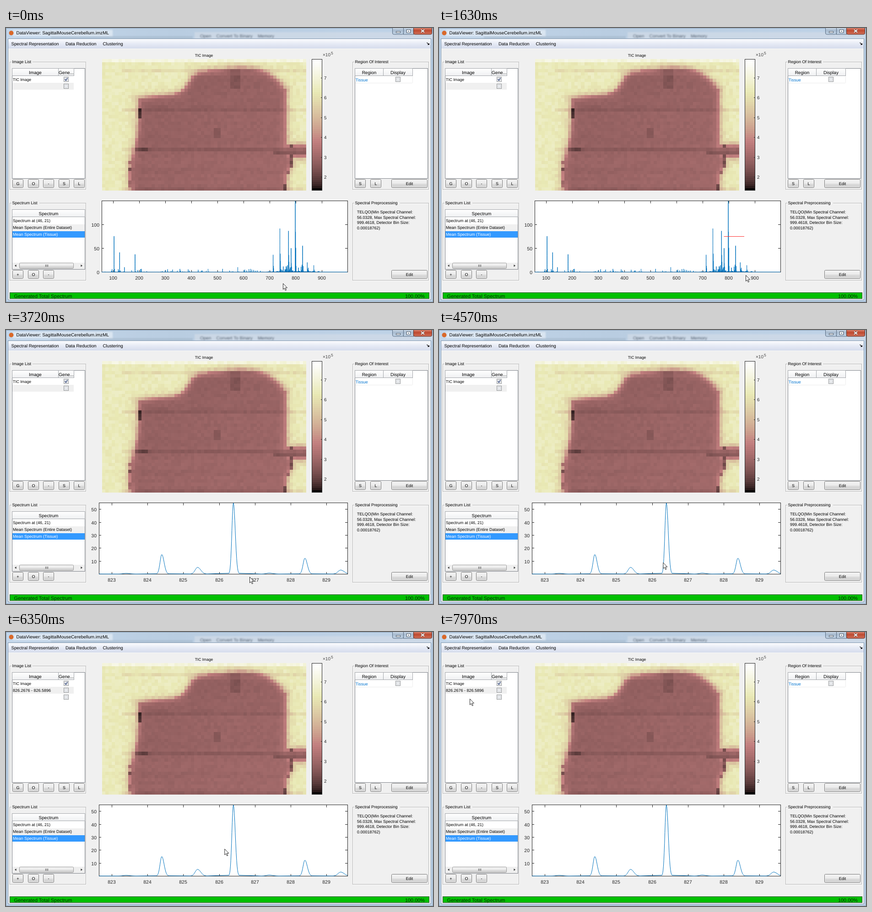
Write an HTML page that moves like this. It is 933 px wide and 600 px high and loops after 8000 ms.

```html
<!DOCTYPE html>
<html lang="en">
<head>
<meta charset="utf-8">
<title>DataViewer</title>
<style>
  html, body { margin: 0; width: 100%; height: 100%; overflow: hidden; background: #f0f0f0; }
  svg { display: block; width: 933px; height: 600px; }
  text { font-family: "Liberation Sans", Arial, sans-serif; text-rendering: geometricPrecision; white-space: pre; }
</style>
</head>
<body>
<svg id="stage" viewBox="0 0 933 600" xmlns="http://www.w3.org/2000/svg">
  <defs>
    <linearGradient id="glass">
      <stop offset="0" stop-color="#c3d6ea"/><stop offset=".4" stop-color="#b9cde1"/><stop offset="1" stop-color="#bfd3e8"/>
    </linearGradient>
    <linearGradient id="menu" x2="0" y2="1">
      <stop offset="0" stop-color="#fbfcfe"/><stop offset=".5" stop-color="#e6eaf5"/><stop offset="1" stop-color="#d5dcec"/>
    </linearGradient>
    <linearGradient id="btn" x2="0" y2="1">
      <stop offset="0" stop-color="#f4f4f4"/><stop offset=".5" stop-color="#ebebeb"/>
      <stop offset=".51" stop-color="#dddddd"/><stop offset="1" stop-color="#cfcfcf"/>
    </linearGradient>
    <linearGradient id="head" x2="0" y2="1">
      <stop offset="0" stop-color="#fff"/><stop offset="1" stop-color="#eff0f2"/>
    </linearGradient>
    <linearGradient id="caption" x2="0" y2="1">
      <stop offset="0" stop-color="#d3dfec"/><stop offset=".5" stop-color="#a9bcd0"/><stop offset="1" stop-color="#c2d4e6"/>
    </linearGradient>
    <linearGradient id="close" x2="0" y2="1">
      <stop offset="0" stop-color="#e0a090"/><stop offset=".5" stop-color="#bf4a30"/><stop offset="1" stop-color="#d0705a"/>
    </linearGradient>
    <filter id="blur" x="-20%" y="-100%" width="140%" height="300%"><feGaussianBlur stdDeviation="1.6"/></filter>
    <clipPath id="clip"><rect id="clipBox"/></clipPath>
  </defs>
  <g id="ui"></g>
  <g id="heat" shape-rendering="crispEdges"></g>
  <g id="plot"></g>
  <path id="range" fill="none"/>
  <g id="newRow"></g>
  <path id="cursor" d="M.5.5V13.4L3.4 10.7 5.5 15.6 7.5 14.7 5.4 9.9H9.5Z" fill="#fff" stroke="#111" stroke-width=".9"/>
</svg>
<script>
const $ = id => document.getElementById(id);
const lerp = (a, b, p) => a + (b - a) * p;
const smooth = p => p * p * (3 - 2 * p);
const bell = x => Math.exp(-x * x);
const clamp = x => Math.max(0, Math.min(1, x));

function random(seed) {
  return () => {
    seed = (seed * 1664525 + 1013904223) >>> 0;
    return seed / 4294967296;
  };
}

// Markup helpers
const rect = (x, y, w, h, fill, stroke = "none", more = "") =>
  `<rect x="${x}" y="${y}" width="${w}" height="${h}" fill="${fill}" stroke="${stroke}" ${more}/>`;
const text = (x, y, s, size = 9, fill = "#000", anchor = "start") =>
  `<text x="${x}" y="${y}" font-size="${size}" fill="${fill}" text-anchor="${anchor}">${s}</text>`;
const path = (d, stroke, width = 1, fill = "none") =>
  `<path d="${d}" stroke="${stroke}" stroke-width="${width}" fill="${fill}"/>`;
const button = (x, y, w, s) =>
  rect(x + .5, y + .5, w - 1, 18, "url(#btn)", "#757575", 'rx="2"') +
  rect(x + 1.5, y + 1.5, w - 3, 16, "none", "#f8f8f8", 'rx="1" stroke-opacity=".7"') +
  text(x + w / 2, y + 13, s, 9, "#000", "middle");
const buttons = (x, y, labels) =>
  [...labels].map((c, i) => button(x + Math.round(33.6 * i), y, 24, c)).join("");
const panel = (x, y, h, title, w) =>
  rect(x + 1.5, y + 1.5, 166, h, "none", "#fff") + rect(x + .5, y + .5, 166, h, "none", "#b4b4b4") +
  rect(x + 4, y - 3, w + 4, 8, "#f0f0f0") + text(x + 5.5, y + 3, title);
const table = (x, y, h) => rect(x + .5, y + .5, 159, h, "#fff", "#7f838a");
const header = (x, y, w, s) =>
  rect(x + .5, y + .5, w, 16, "url(#head)", "#a4a7ab") + text(x + w / 2 + .5, y + 13, s, 10, "#000", "middle");
const checkbox = (x, y, on) =>
  rect(x + .5, y + .5, 10, 10, "#f8f8f8", "#8e9194") + rect(x + 2.5, y + 2.5, 6, 6, "#eaecef", "#cfd3d8") +
  (on ? path(`M${x + 2.7} ${y + 5}l2.2 3 3.6-6`, "#34487c", 1.4) : "");

function drawWindow() {
  let s = rect(0, 0, 933, 600, "url(#glass)");
  s += `<g filter="url(#blur)">` + rect(15, 4, 218, 14, "#eef4fa", "none", 'opacity=".6"') +
    rect(98, 18, 310, 5, "#8fa3b8", "none", 'opacity=".35"') +
    rect(412, 9, 521, 15, "#d2dce7", "none", 'opacity=".7"') +
    text(424, 21, "Open    Convert To Binary    Memory", 10, "#3b4a5c") + "</g>";
  s += rect(.5, .5, 932, 599, "none", "#8ba3bc") + rect(4.5, 23.5, 924, 572, "#f0f0f0", "#8096ad");
  s += `<circle cx="11.5" cy="11" r="5" fill="#d9692b"/>` + text(22.5, 14, "DataViewer: SagittalMouseCerebellum.imzML", 9.95);

  s += rect(844.5, -3, 24, 17, "url(#caption)", "#566a80", 'rx="3"') +
    rect(868.5, -3, 22, 17, "url(#caption)", "#566a80") +
    rect(890.5, -3, 40, 17, "url(#close)", "#5a2a22", 'rx="3"') +
    rect(852.5, 7.5, 9, 3, "#fff", "#4b5868") + rect(875.5, 3.5, 8, 7, "#fff", "#4b5868") +
    rect(878, 6, 3, 2, "#6a7d92") +
    path("M907 3.5l7 6M914 3.5l-7 6", "#55302a", 3.2) + path("M907 3.5l7 6M914 3.5l-7 6", "#fff", 1.9);

  s += rect(5, 24, 923, 21, "url(#menu)") + rect(5, 45, 923, 1, "#f8f8f8") +
    text(11.5, 38, "Spectral Representation", 9.7) + text(130, 38, "Data Reduction", 9.8) +
    text(211.5, 38, "Clustering", 9.8) +
    path("M919.5 32l4 3.5", "#111", 1.2) + path("M925 37h-4.4l4.4-4z", "none", 0, "#111");

  s += panel(8, 74, 279, "Image List", 42) + panel(8, 383, 169, "Spectrum List", 57) +
    panel(757, 74, 279, "Region Of Interest", 74) + panel(757, 383, 169, "Spectral Preprocessing", 96);

  s += table(13, 88, 241) + header(13, 88, 101, "Image") + header(114, 88, 34, "Gene...") +
    rect(14, 120, 134, 15, "#f0f0f0") + text(15, 116, "TIC Image", 8.6) +
    checkbox(126, 107, true) + checkbox(126, 122);
  s += table(762, 88, 241) + header(762, 88, 62, "Region") + header(824, 88, 64, "Display") +
    text(763.5, 116.5, "Tissue", 9.4, "#0a78d0") + checkbox(851, 107) +
    path("M763 120.5H888M888.5 105V120", "#ececec");
  s += table(13, 397, 131) + header(13, 397, 159, "Spectrum") +
    rect(14, 430, 158, 15, "#f0f0f0") + rect(14, 445, 158, 14, "#3399ff") +
    text(15, 425, "Spectrum at (46, 21)") + text(15, 440, "Mean Spectrum (Entire Dataset)") +
    text(15, 455, "Mean Spectrum (Tissue)", 9, "#fff");
  s += rect(14, 514, 158, 14, "#efefef") + rect(29.5, 514.5, 118, 12, "url(#btn)", "#979797", 'rx="2"') +
    path("M86.5 518v5M89 518v5M91.5 518v5", "#555") +
    path("M22.5 518v5l-3.5-2.5zM163.5 518v5l3.5-2.5z", "none", 0, "#333");

  s += buttons(14, 331, "GO-SL") + buttons(14, 530, "+O-") + buttons(762, 331, "SL") +
    button(842, 331, 79, "Edit") + button(842, 530, 79, "Edit");

  ["TELQO(Min Spectral Channel:", "56.0328, Max Spectral Channel:", "999.4618, Detector Bin Size:", "0.00018762)"]
    .forEach((line, i) => s += text(767, 406 + 11.7 * i, line));

  s += rect(8.5, 579.5, 916, 13, "#00c000", "#1d4d1d") + text(17.5, 590.5, "Generated Total Spectrum", 10.9, "#012b01") +
    text(915, 590.5, "100.00%", 10.9, "#012b01", "end");
  s += text(432.5, 63, "TIC Image", 8.5, "#000", "middle");
  $("ui").innerHTML = s;
  $("newRow").innerHTML = text(15, 131, "826.2676 - 826.5896") + checkbox(126, 137);
}

// Heat map: "pink" colour map, v from 0 to 1
function pink(v) {
  const g = clamp(v), hot = [g / .375, (g - .375) / .375, (g - .75) / .25].map(clamp);
  return `rgb(${hot.map(h => Math.round(255 * Math.sqrt((2 * g + h) / 3)))})`;
}

// Tissue outline: a shoulder on the left, a rounded right corner, a bulge and an arm
const topEdge = x => 87 + 42 / (1 + Math.exp((x - 398) / 7)) +
  .12 * Math.max(0, 500 - x) + 40 * (Math.max(0, x - 500) / 105) ** 3;
const leftEdge = y => 289 - 20 * bell((y - 320) / 60);
const rightEdge = y => 612 + 14 * bell((y - 295) / 18);

// Distance from the outline, positive inside
function depth(x, y) {
  const slope = (topEdge(x + 2) - topEdge(x - 2)) / 4;
  const body = Math.min(x - leftEdge(y), rightEdge(y) - x, (y - topEdge(x)) / Math.hypot(1, slope));
  return x > 605 ? Math.max(body, 13.5 - Math.abs(y - 269.5)) : body;
}

// Dark patches: column, row, width, height, drop in level
const PATCHES = [[39, 3, 3, 6, .35], [34, 21, 2, 3, .4], [11, 15, 1, 3, 1.7], [10, 27, 4, 1, .6], [52, 28, 10, 1, .6], [57, 31, 1, 2, 1.6]];

function drawHeat() {
  const cell = 7.2, left = 209.5, top = 68, rnd = random(11);
  let s = "";
  for (let r = 0; r < 40; r++) {
    const streak = r % 12 === 3, shift = (rnd() - .5) * .12;
    for (let c = 0; c < 62; c++) {
      const x = left + (c + .5) * cell, y = top + (r + .5) * cell, d = depth(x, y), n = rnd() - .5;
      let v = d > 0
        ? 2.6 + 1.2 * Math.exp(-d / 5) + .25 * (c / 62) + .2 * (r / 40) + .2 * n + shift - (streak ? .25 : 0)
        : 6.4 - 2.2 * Math.exp(d / 7) + .5 * n + (r ? 0 : .8) - (streak && c > 5 ? .5 : 0);
      for (const [pc, pr, w, h, drop] of PATCHES)
        if (c >= pc && c < pc + w && r >= pr && r < pr + h) v -= drop;
      if (r > 25 && Math.abs(d) < 5 && rnd() > .85) v -= 1.5;
      s += rect((left + c * cell).toFixed(1), (top + r * cell).toFixed(1), cell, cell, pink((v - 1.33) / 6.62));
    }
  }
  for (let i = 0; i < 64; i++) s += rect(669, 355 - (i + 1) * 4.484, 22, 4.6, pink(i / 63));
  s += rect(668.5, 68.5, 22, 287, "none", "#262626");
  for (let v = 2; v < 8; v++) {
    const y = Math.round(412.8 - 43.4 * v) + .5;
    s += path(`M688 ${y}h3`, "#262626") + text(695, y + 3.5, v, 9.8, "#262626");
  }
  s += text(692, 62, "×10", 10, "#444") + text(710, 58, "5", 8.5, "#444");
  $("heat").innerHTML = s;
}

// Main peaks: mass, height
const MAIN = [[103.7, 75], [125, 41], [143.5, 10], [184.2, 37], [578, 10], [713.4, 36], [739.4, 91], [772.4, 86],
  [782.4, 50], [798.4, 150], [810.4, 9], [820.4, 11], [824.4, 15], [826.4, 55], [844.4, 20], [848.4, 9], [869.4, 14]];

// Heavy peaks get isotopes one unit apart; small seeded peaks fill the rest
function buildPeaks() {
  const peaks = [...MAIN], rnd = random(5);
  const add = (m, h) => peaks.some(p => Math.abs(p[0] - m) < .8) || peaks.push([m, h]);
  for (const [m, h] of MAIN.filter(p => p[0] > 700)) {
    const second = h * (.34 + .22 * (h / 150) ** 2);
    [1, .6, .15].forEach((k, i) => add(m + i + 1, second * k));
  }
  for (let m = 60.4; m < 690; m += 2 + rnd() * 3) add(m, 7 * rnd() ** 8);
  for (let m = 690.4; m < 890; m++) add(m, (2 + 30 * bell((m - 766) / 14)) * rnd() ** 3);
  return peaks.sort((a, b) => a[0] - b[0]);
}
const peaks = buildPeaks();

// Axes: box edges, a known tick and its pixel, scales, tick ranges
const VIEWS = [
  { l: 209, r: 746, x0: 100, px: 234, kx: .57, xs: [100, 900, 100], ky: 1.045, ys: [0, 100, 50] },
  { l: 209, r: 737, x0: 790, px: 263, kx: 6.771, xs: [790, 860, 10], ky: 1.045, ys: [0, 100, 50] },
  { l: 203, r: 746, x0: 823, px: 231, kx: 78.17, xs: [823, 829, 1], ky: 2.84, ys: [10, 50, 10] }
];
function drawPlot(v) {
  const top = 379, base = 534.3;
  const X = m => v.px + (m - v.x0) * v.kx, Y = h => base - h * v.ky;
  let ticks = "", labels = "", d = `M${v.l} ${base}`;
  for (let m = v.xs[0]; m <= v.xs[1]; m += v.xs[2]) {
    const x = Math.round(X(m)) + .5;
    ticks += `M${x} ${top}v5M${x} 535v-5`;
    labels += text(x - .5, 550.5, m, 10.5, "#262626", "middle");
  }
  for (let h = v.ys[0]; h <= v.ys[1]; h += v.ys[2]) {
    const y = Math.round(Y(h)) + .5;
    if (h) ticks += `M${v.l} ${y}h5M${v.r} ${y}h-5`;
    labels += text(v.l - 5, y + 4, h, 10.5, "#262626", "end");
  }
  for (const [m, h] of peaks) {
    const x = X(m), w = .8 + 2.6 * Math.max(h, 4) ** -.8;
    if (x < v.l - 40 || x > v.r + 40) continue;
    for (let k = -3; k <= 3; k += .25) {
      const sigma = (k < 0 ? .045 : .058) * w;
      d += `L${X(m + k * sigma).toFixed(2)} ${Y(h * bell(k / Math.SQRT2)).toFixed(2)}`;
    }
  }
  d += `L${v.r} ${base}`;
  const box = { x: v.l, y: top, width: v.r - v.l, height: 157 };
  for (const k in box) $("clipBox").setAttribute(k, box[k]);
  $("plot").innerHTML = rect(v.l + .5, top - .5, v.r - v.l, 156, "#fff", "#262626") + path(ticks, "#262626") +
    `<g clip-path="url(#clip)">${path(d, "#0072bd")}</g>` + labels;
}

// Pointer: each move starts where the last one stopped and advances in video steps
const START = [605, 559], STEP = 78;
const MOVES = [
  [290, 1070, 623, 545], [1160, 1630, 670, 541], [2000, 2550, 464, 553], [2626, 2780, 472, 548],
  [2850, 3640, 533, 541], [3720, 4500, 489, 509], [4570, 5430, 511, 507], [5510, 5670, 512.5, 507],
  [6260, 7040, 109, 135], [7120, 7580, 30, 132], [7660, 7970, 67, 146]
];
function pointer(t) {
  let [x, y] = START;
  for (const [start, end, tx, ty] of MOVES) {
    if (t < start) break;
    const n = Math.round((end - start) / STEP);
    const step = Math.floor(clamp((t - start) / (end - start)) * n + .01);
    const p = smooth((step + 1) / (n + 1));
    x = lerp(x, tx, p);
    y = lerp(y, ty, p);
  }
  return [x, y];
}

// Range lines follow the pointer while it drags
const DRAGS = [
  { from: 1160, until: 1770, x: 622.5, y: 456.5, color: "#ff3030" },
  { from: 2850, until: 3720, x: 484, y: 456.5, color: "#ff3030" },
  { from: 4570, until: 5880, x: 486.5, y: 503, color: "#30e030" }
];

let shown = null;
function render(t) {
  const view = VIEWS[t < 1770 ? 0 : t < 3720 ? 1 : 2];
  if (view !== shown) drawPlot(shown = view);
  const [x, y] = pointer(t), tip = x - 3;
  $("cursor").setAttribute("transform", `translate(${x.toFixed(1)} ${y.toFixed(1)})`);
  const drag = DRAGS.find(g => t >= g.from && t < g.until && tip > g.x);
  $("range").setAttribute("d", drag ? `M${drag.x} ${drag.y}H${tip}` : "");
  if (drag) $("range").setAttribute("stroke", drag.color);
  $("newRow").setAttribute("visibility", t >= 5960 ? "visible" : "hidden");
}

drawWindow();
drawHeat();
const began = performance.now();
function frame() {
  render((performance.now() - began) % 8000);
  requestAnimationFrame(frame);
}
render(0);
requestAnimationFrame(frame);
</script>
</body>
</html>
```
